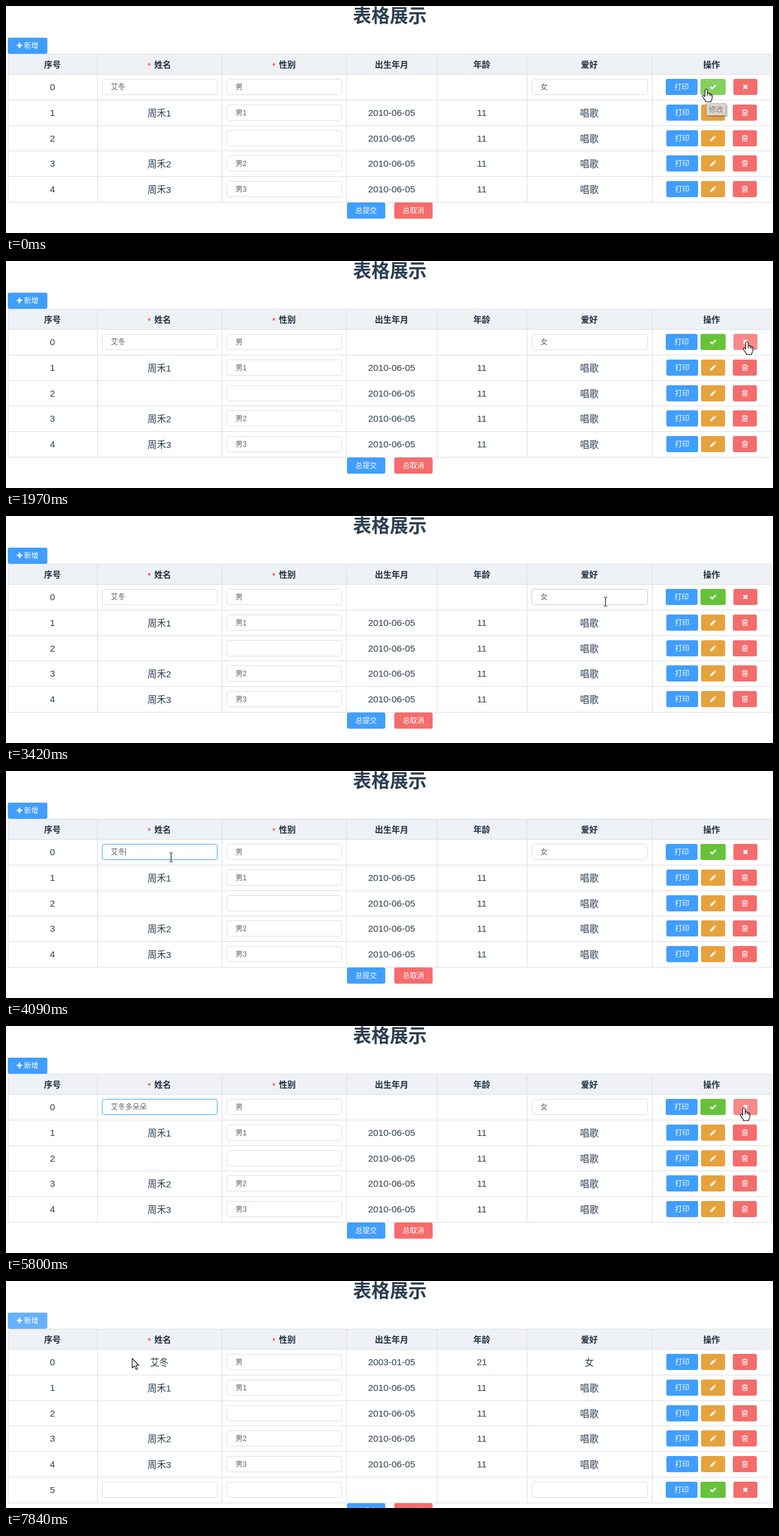
Animation, 1280 px wide and 380 px high, one loop 7.99 s. Source, as an HTML page with a canvas:

```html
<!DOCTYPE html>
<html lang="zh">
<head>
<meta charset="utf-8">
<style>
html, body { margin: 0; width: 100%; height: 100%; overflow: hidden; background: #fff; }
canvas { display: block; }
</style>
</head>
<body>
<canvas id="stage" width="1280" height="380"></canvas>
<script>
const ctx = document.getElementById('stage').getContext('2d');
const LOOP = 7990;
const FONT = 'px "Liberation Sans", "Noto Sans CJK SC", "Noto Sans CJK", sans-serif';
const LINE = '#dcdee2', INK = '#2c3e50';
const BLUE = ['#409eff', '#66b1ff'], GREEN = ['#67c23a', '#85ce61'];
const RED = ['#f56c6c', '#f78989'], AMBER = ['#e6a23c', '#ebb563'];

const narrow = [3, 152, 360, 568, 719, 869, 1078, 1277];
const wide = [3, 165, 329, 563, 727, 891, 1054, 1277];
const heads = ['序号', '姓名', '性别', '出生年月', '年龄', '爱好', '操作'];
const BIRTH = '2010-06-05';
const people = [
  ['艾冬', '男', '2003-01-05', '21', '女'],
  ['周禾1', '男1', BIRTH, '11', '唱歌'],
  ['', '', BIRTH, '11', '唱歌'],
  ['周禾2', '男2', BIRTH, '11', '唱歌'],
  ['周禾3', '男3', BIRTH, '11', '唱歌']
];
const blank = ['', '', '', '', ''];

const icons = {
  plus: ['M-4.5 0H4.5M0-4.5V4.5', 2.6],
  check: ['M-4.5 0L-1.5 3L4.5-3.2', 2.5],
  cross: ['M-3-3L3 3M3-3L-3 3', 2.8],
  pencil: ['M-5 5L-4.3 1.8L1.2-3.7L3.7-1.2L-1.8 4.3ZM2-4.5L3-5.3L5.2-3L4.5-2Z', 0],
  trash: ['M-5-3.5H5M-2-3.5V-5H2V-3.5M-3.7-3.5V4.8H3.7V-3.5M-1.6-1.5V3M0-1.5V3M1.6-1.5V3', 1]
};
const pointers = {
  hand: 'M-2 2Q0-1 2 2V8Q4 6 5.5 8.5Q7 7 8 9.5Q10 8.5 10 11V15Q10 18 8 20V22H-1V20Q-4 17-6 13Q-6 10-3.5 11.5L-2 13Z',
  arrow: 'M0 0V16L4 12.5L6.5 18.5L9 17.5L6.5 11.5H11Z',
  beam: 'M-3-7.5H-.5M.5-7.5H3M0-7V7M-3 7.5H-.5M.5 7.5H3'
};

// The screen refreshes in bursts: start, end, number of steps
const bursts = [[1430, 2220, 7], [2490, 3420, 8], [3570, 4550, 8],
  [4990, 5800, 7], [6070, 7050, 8], [7170, 7840, 6]];
// Pointer path: time, x, y
const path = [[0, 1168, 138], [1300, 1168, 138], [1430, 1172, 137], [1950, 1236, 134],
  [2490, 1234, 134], [2888, 1135, 137], [3020, 1165, 139], [3155, 1165, 139],
  [3420, 1000, 143], [3980, 275, 144], [5125, 275, 144], [5660, 1231, 136],
  [6070, 1231, 136], [6770, -4, 77], [7050, 30, 66], [7304, 30, 66], [7840, 210, 129]];

let mouse, pointer;

function snap(t) {
  const run = bursts.findLast(b => t >= b[0]);
  if (!run) return 0;
  const [start, end, n] = run, step = (end - start) / (n - 1);
  return start + step * Math.min(n - 1, Math.floor((t - start + 10) / step));
}

function locate(t) {
  const i = path.findIndex(p => p[0] > t);
  if (i < 0) return path.at(-1).slice(1);
  const [t0, x0, y0] = path[i - 1], [t1, x1, y1] = path[i];
  const k = (t - t0) / (t1 - t0);
  return [Math.round(x0 + (x1 - x0) * k), Math.round(y0 + (y1 - y0) * k)];
}

function text(s, x, y, size, color, align = 'center', weight = '') {
  ctx.font = weight + ' ' + size + FONT;
  ctx.textAlign = align;
  ctx.fillStyle = color;
  ctx.fillText(s, x, y);
}

function rect(x, y, w, h, color) {
  ctx.fillStyle = color;
  ctx.fillRect(x, y, w, h);
}

function round(x, y, w, h, r) {
  ctx.beginPath();
  ctx.roundRect(x, y, w, h, r);
}

function over(x, y, w, h, kind) {
  const [mx, my] = mouse;
  const hit = mx >= x && mx < x + w && my >= y && my < y + h;
  if (hit) pointer = kind;
  return hit;
}

function icon(name, x, y) {
  const [d, width] = icons[name], shape = new Path2D(d);
  ctx.save();
  ctx.translate(x, y);
  ctx.fillStyle = ctx.strokeStyle = '#fff';
  ctx.lineWidth = width;
  width ? ctx.stroke(shape) : ctx.fill(shape);
  ctx.restore();
}

function button(x, y, w, [normal, light], label, focused = false) {
  const hovered = over(x, y, w, 27, 'hand');
  round(x, y, w, 27, 3);
  ctx.fillStyle = hovered || focused ? light : normal;
  ctx.fill();
  if (icons[label]) icon(label, x + w / 2, y + 13.5);
  else text(label, x + w / 2, y + 18, 12, '#fff');
}

function input(left, right, y, value, focused, caret) {
  const x = left + 8, w = right - left - 15;
  const hovered = over(x, y, w, 27, 'beam');
  round(x + .5, y + .5, w - 1, 26, 4);
  ctx.fillStyle = '#fff';
  ctx.fill();
  ctx.lineWidth = 1;
  ctx.strokeStyle = focused ? '#409eff' : hovered ? '#c0c4cc' : '#dcdfe6';
  ctx.stroke();
  text(value, x + 15, y + 18, 12, '#606266', 'left');
  if (caret) rect(Math.round(x + 15 + ctx.measureText(value).width), y + 7, 1, 13, '#606266');
}

function row(i, data, cols, s) {
  const y = Math.round(122.3 + 42.7 * i);
  const editing = i === 5 || (i === 0 && s.edit);
  const mid = c => (cols[c] + cols[c + 1]) / 2;
  const cell = (c, v) => text(v, mid(c), y + (/^[\d-]*$/.test(v) ? 19 : 19.7), 15.4, INK);
  const first = i === 0;
  cell(0, String(i));
  if (editing) {
    const name = first && s.typed ? data[0] + '多朵朵' : data[0];
    input(cols[1], cols[2], y, name, first && s.focusName, first && s.caret);
    input(cols[5], cols[6], y, data[4]);
  } else {
    cell(1, data[0]);
    cell(3, data[2]);
    cell(4, data[3]);
    cell(5, data[4]);
  }
  input(cols[2], cols[3], y, data[1]);

  if (editing) {
    button(1101, y, 53, BLUE, '打印');
    button(1159, y, 42, GREEN, 'check');
    button(1214, y, 40, RED, 'cross');
  } else {
    const [a, b, c] = cols === wide ? [1091, 1148, 1202] : [1102, 1160, 1213];
    button(a, y, 53, BLUE, '打印');
    button(b, y, 40, AMBER, 'pencil');
    button(c, y, 40, RED, 'trash', first && s.focusTrash);
  }
}

function table(cols, rows, s) {
  rect(3, 80, 1275, 34, '#eef1f6');
  const bottom = Math.round(114.3 + 42.7 * rows.length);
  cols.forEach(x => rect(x, 80, 1, bottom - 79, LINE));
  rect(3, 80, 1275, 1, LINE);
  for (let i = 0; i <= rows.length; i++) rect(3, Math.round(114.3 + 42.7 * i), 1275, 1, LINE);
  heads.forEach((h, i) => {
    const x = (cols[i] + cols[i + 1]) / 2, required = i === 1 || i === 2;
    text(h, x + (required ? 5.5 : 0), 103, 14, '#1f2d3d', 'center', 'bold');
    if (required) text('*', x - 17, 105, 14, '#ff2a2a');
  });
  rows.forEach((r, i) => row(i, r, cols, s));
  button(569, bottom + 1, 64, BLUE, '总提交');
  button(648, bottom + 1, 64, RED, '总取消');
}

function tooltip(alpha) {
  ctx.save();
  ctx.globalAlpha = alpha;
  rect(1171, 166, 34, 20, 'rgba(0,0,0,.22)');
  rect(1168, 163, 34, 21, '#767676');
  rect(1169, 164, 32, 19, '#fff');
  text('修改', 1185, 177.5, 12, '#575757');
  ctx.restore();
}

function drawPointer() {
  const shape = new Path2D(pointers[pointer]);
  ctx.save();
  ctx.translate(mouse[0] + .5, mouse[1] + .5);
  ctx.lineWidth = 1.1;
  ctx.lineJoin = 'round';
  ctx.strokeStyle = '#111';
  ctx.fillStyle = '#fff';
  if (pointer !== 'beam') ctx.fill(shape);
  ctx.stroke(shape);
  if (pointer === 'hand') ctx.stroke(new Path2D('M2 8V12M5.5 8.5V12M8 9.5V12.5'));
  ctx.restore();
}

function draw(now) {
  const time = now % LOOP, t = snap(time);
  const s = {
    edit: t < 2219 || (t > 3150 && t < 6069),
    added: t > 7300,
    typed: t > 4980,
    focusName: t > 3985,
    caret: t > 3985 && t < 5600,
    focusTrash: (t > 2219 && t < 3150) || (t > 6060 && t < 7165)
  };
  mouse = locate(t);
  pointer = 'arrow';
  rect(0, 0, 1280, 380, '#fff');
  text('表格展示', 640.5, 27, 30.8, INK, 'center', 'bold');
  button(3, 53, 66, BLUE, '', t > 7165);
  icon('plus', 22.5, 66);
  text('新增', 30, 70.5, 12, '#fff', 'left');
  table(s.edit || s.added ? narrow : wide, s.added ? [...people, blank] : people, s);
  if (time < 1430) tooltip(time < 120 ? .68 : time < 400 ? .97 : 1);
  drawPointer();
}

function loop() {
  draw(performance.now());
  requestAnimationFrame(loop);
}
loop();
</script>
</body>
</html>
```
